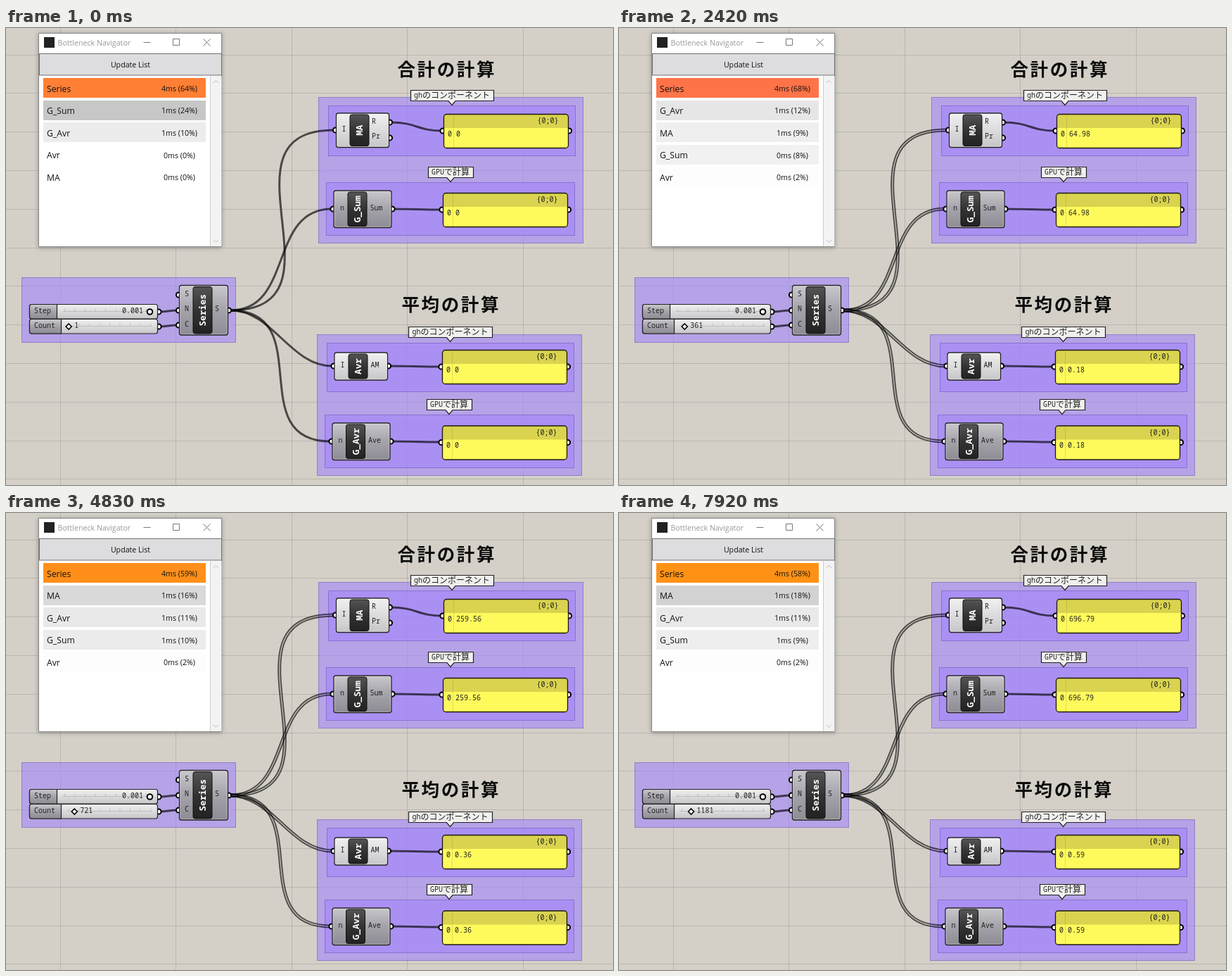
Write an HTML page that moves like this. It is 863 by 649 pixels and loops after 8000 ms.

```html
<!DOCTYPE html>
<html lang="ja">
<head>
<meta charset="utf-8">
<style>
html, body { margin: 0; width: 100%; height: 100%; overflow: hidden; background: #d4d0c8; }
svg { display: block; }
text { fill: #222; white-space: pre; }
.mono { font: 10px "Noto Sans Mono", monospace; }
.kana { font: 12px "Noto Sans CJK JP", "Noto Sans CJK", sans-serif; }
.head { font: bold 25.5px "Noto Sans CJK JP", "Noto Sans CJK", sans-serif; letter-spacing: 2.6px; fill: #0b0b0b; }
.name { font: bold 12.7px "Noto Sans Mono", monospace; fill: #fff; }
.ui { font: 10.65px "Open Sans", sans-serif; fill: #111; }
.row { font: 12.2px "Open Sans", sans-serif; fill: #111; }
.mid { text-anchor: middle; }
.wire { fill: none; stroke: #000; stroke-opacity: .65; stroke-width: 3; }
.group { fill: rgba(165,135,250,.62); stroke: rgba(105,80,185,.55); }
.pin { fill: #fff; stroke: #000; stroke-width: 2; }
.window { fill: #fff; stroke: #888; filter: drop-shadow(0 1px 3px rgba(0,0,0,.3)); }
</style>
</head>
<body>
<script>
const SERIES_OUT = [319, 401];
const LOOP = 8000, TICK = 134.2;
const names = ["Series", "G_Avr", "G_Sum", "MA", "Avr"];
// step, share of each component in %, total ms
const profile = [
  [0, 64, 10, 24, .3, .4, 6.2],
  [10, 73, 12, 8, 4, 1, 5.5],
  [24, 64, 12.1, 8, 12, 2, 6.5],
  [36, 59, 11, 10, 16, 2, 6.5],
  [44, 62, 11, 9, 14, 2, 6.5],
  [49, 57, 11, 10, 18, 2, 6.5],
  [59, 58, 11, 9, 18, 2, 6.5]
];
const greys = [[0, 255], [2, 253], [4, 250], [8, 241], [12, 230], [18, 210], [24, 199], [50, 170]];

const rect = (x, y, w, h, attrs = "") => `<rect x="${x}" y="${y}" width="${w}" height="${h}" ${attrs}/>`;
const path = (d, attrs = "") => `<path d="${d}" ${attrs}/>`;
const text = (x, y, s, cls = "mono", attrs = "") => `<text x="${x}" y="${y}" class="${cls}" ${attrs}>${s}</text>`;
const group = (x, y, x2, y2) => rect(x + .5, y + .5, x2 - x, y2 - y, 'class="group"');
const pin = (x, y) => `<circle cx="${x}" cy="${y}" r="3.6" class="pin"/>`;
const curve = (x1, y1, x2, y2, c) => `M${x1} ${y1}C${x1 + c} ${y1} ${x2 - c} ${y2} ${x2} ${y2}`;
const wire = (...p) => path(curve(...p), 'class="wire"');
const gradient = (id, ...stops) => `<linearGradient id="${id}" x2="0" y2="1">` +
  stops.map((c, i) => `<stop offset="${i / (stops.length - 1)}" stop-color="${c}"/>`).join("") + "</linearGradient>";

function grid() {
  let d = "";
  for (let x = 77; x < 863; x += 164.5) d += `M${Math.floor(x) + .5} 0V649`;
  for (let y = 38; y < 649; y += 54.8) d += `M0 ${Math.floor(y) + .5}H863`;
  return path(d, 'stroke="#000" stroke-opacity=".12"');
}

function dataWire(x, y, c, i) {
  const d = curve(...SERIES_OUT, x, y, c);
  return `<mask id="m${i}" maskUnits="userSpaceOnUse" x="0" y="0" width="863" height="649">
    <rect width="863" height="649" fill="#fff"/>${path(d, 'fill="none" stroke="#000" stroke-opacity=".8" stroke-width="1.5"')}</mask>` +
    path(d, `class="wire data" data-mask="url(#m${i})"`);
}

function node(x, y, w, h, fill, label, lx, ins, outs) {
  const cx = lx + 13.5, cy = y + h / 2;
  const port = ([px, py, s]) => text(px, py + 3.2, s, "mono mid");
  return ins.map(p => pin(x - 1, p[3])).join("") + outs.map(p => pin(x + w + 1, p[3])).join("") +
    rect(x, y, w, h, `rx="3" fill="url(#${fill})" stroke="#222" stroke-width="1.3"`) +
    rect(x + 1.2, y + 1.2, w - 2.4, h - 2.4, 'rx="2" fill="none" stroke="#fff" stroke-opacity=".35"') +
    rect(lx, y + 2, 27, h - 4, 'rx="3" fill="url(#dark)" stroke="#111"') +
    text(0, 4.6, label, "name mid", `transform="translate(${cx} ${cy}) rotate(-90)"`) +
    [...ins, ...outs].map(port).join("");
}

function panel(x, y, cls) {
  const w = 177, h = 48;
  return pin(x - 1.5, y + 23.5) + pin(x + w + 1, y + 23.5) +
    rect(x, y, w, h, 'rx="4" fill="#fffa5c"') +
    path(`M${x} ${y + 19.5}v-15.5q0-4 4-4h${w - 8}q4 0 4 4v15.5z`, 'fill="#d9d34f"') +
    path(`M${x + 14} ${y}v${h}`, 'stroke="#8a8420" stroke-opacity=".25"') +
    rect(x, y, w, h, 'rx="4" fill="none" stroke="#1c1b0c" stroke-width="1.3"') +
    text(x + w - 44, y + 12.5, "{0;0}") + text(x + 5.5, y + 31, "0 0", "mono " + cls);
}

function tag(x, y, w, latin, kana) {
  const c = x + w / 2, lw = latin.length * 6, left = c - (lw + kana.length * 12) / 2;
  return path(`M${x + .5} ${y + .5}h${w}v15H${c + 5}l-5 6l-5-6H${x + .5}z`, 'fill="#f0f0ee" stroke="#222" stroke-width="1.2"') +
    text(left, y + 11, latin) + text(left + lw, y + 12, kana, "kana");
}

function slider(y, split, label) {
  let ticks = "";
  for (let x = split + 11; x < 208; x += 14.5) ticks += `M${x} ${y + 6}v4`;
  return pin(217, y + 10.5) +
    rect(33.5, y, 182, 20.5, 'rx="3" fill="url(#light)" stroke="#222" stroke-width="1.2"') +
    path(`M${split} ${y}H36.5q-3 0-3 3v14.5q0 3 3 3H${split}z`, 'fill="url(#grey)" stroke="#222" stroke-width="1.2"') +
    path(ticks + `M${split + 8} ${y + 10}H208`, 'stroke="#999" stroke-opacity=".45"') +
    text(40, y + 12.5, label);
}

function listWindow() {
  const rows = names.map((_, i) => {
    const y = 71 + 31.6 * i;
    return rect(53, Math.round(y), 231, 28, 'class="bar"') + text(58, y + 19.5, "", "row item") +
      text(246.5, y + 18.7, "", "ui mid share");
  }).join("");
  return rect(46.5, 7.5, 260, 303, 'class="window"') +
    rect(54, 13, 15, 15, 'fill="#222"') +
    text(73.5, 25, "Bottleneck Navigator", "ui", 'style="fill:#999"') +
    path("M195.5 20.5h10M237.5 15.5h9v9h-9zM280.5 15.5l10 10m0-10l-10 10", 'fill="none" stroke="#777"') +
    rect(47.5, 36.5, 259, 30.5, 'fill="#dddddf" stroke="#707070"') +
    text(177, 56, "Update List", "ui mid") +
    rect(290.5, 68, 16, 242, 'fill="#f3f3f3"') + path("M290.5 68v242", 'stroke="#ccc"') +
    path("M295 78l3.5-3.5l3.5 3.5M295 301l3.5 3.5l3.5-3.5", 'fill="none" stroke="#bbb"') + rows;
}

document.body.innerHTML = `<svg width="863" height="649" viewBox="0 0 863 649"><defs>` +
  gradient("light", "#f1f1f1", "#dcdcde", "#c6c6c8") +
  gradient("grey", "#c9c8cc", "#a5a3aa", "#8d8b93") +
  gradient("dark", "#555", "#333", "#222") + "</defs>" + grid() +
  group(22, 354, 326, 446) +
  group(444, 98, 820, 305) + group(458, 110, 809, 181) + group(455, 219, 808, 294) +
  group(442, 435, 818, 635) + group(456, 447, 807, 516) + group(453, 549, 807, 624) +
  [[466, 145, 175], [463, 257, 90], [464, 480, 60], [461, 587, 125]].map((w, i) => dataWire(...w, i)).join("") +
  wire(547, 134, 621, 146, 37) + wire(549, 257, 620, 258, 30) + wire(543, 480, 619, 481, 30) + wire(547, 587, 619, 588, 30) +
  wire(218, 403, 244, 401, 12) + wire(218, 424, 244, 422, 12) +
  slider(392.5, 72.5, "Step") + slider(413.5, 78.5, "Count") +
  text(165, 405, "0.001") + `<circle cx="204.5" cy="403" r="3.8" class="pin"/>` +
  `<path id="knob" d="M0-4l4 4l-4 4l-4-4z" fill="#fff" stroke="#000" stroke-width="1.6"/>` + text(0, 426, "", "mono", 'id="count"') +
  node(246.5, 365.5, 69, 70.5, "grey", "Series", 266, [[257, 378, "S", 379], [257, 399, "N", 401], [257, 421, "C", 422]], [[300, 399, "S", 401]]) +
  node(469.5, 121, 75, 48.5, "light", "MA", 489, [[480.5, 143.5, "I", 145]], [[523, 132.5, "R", 134], [526, 154, "Pr", 156]]) +
  node(466, 231, 82, 52.5, "grey", "G_Sum", 486, [[478, 256, "n", 257]], [[526.5, 256, "Sum", 257]]) +
  node(467, 461, 75.5, 39, "light", "Avr", 487, [[478.5, 479, "I", 480]], [[524.5, 479, "AM", 480]]) +
  node(464, 561, 82, 52.5, "grey", "G_Avr", 483.5, [[475.5, 586, "n", 587]], [[524, 586, "Ave", 587]]) +
  panel(622.5, 122.5, "sum") + panel(621.5, 234.5, "sum") + panel(620.5, 457.5, "avg") + panel(620.5, 565, "avg") +
  tag(575, 88, 118, "gh", "のコンポーネント") + tag(600, 197, 64, "GPU", "で計算") +
  tag(572, 424, 119, "gh", "のコンポーネント") + tag(598, 527, 64, "GPU", "で計算") +
  text(556.5, 67.5, "合計の計算", "head") + text(562.5, 401.5, "平均の計算", "head") +
  listWindow() + "</svg>";

const all = s => [...document.querySelectorAll(s)];
const [wires, bars, items, shares, sums, avgs] = [".data", ".bar", ".item", ".share", ".sum", ".avg"].map(all);
const knob = document.getElementById("knob"), count = document.getElementById("count");

// linear interpolation in a table whose first column is the key
function lookup(table, k) {
  const i = Math.max(1, table.findIndex(r => r[0] >= k));
  const a = table[i - 1], b = table[i], f = (k - a[0]) / (b[0] - a[0]);
  return a.slice(1).map((v, j) => v + (b[j + 1] - v) * f);
}

function shade(p) {
  if (p > 50) return `rgb(255,${149 - (p - 57) * 3.1},${16 + (p - 57) * 5.2})`;
  const g = lookup(greys, p)[0];
  return `rgb(${g},${g},${g})`;
}

function show(step) {
  const n = 1 + 20 * step;
  const x = 89.2 + step * .226;
  knob.setAttribute("transform", `translate(${x} 424)`);
  count.setAttribute("x", x + 8);
  count.textContent = n;
  const sum = +(n * (n - 1) / 2000).toFixed(2), avg = +((n - 1) / 2000).toFixed(2);
  sums.forEach(e => e.textContent = "0 " + sum);
  avgs.forEach(e => e.textContent = "0 " + avg);
  wires.forEach(w => {
    w.style.strokeWidth = n > 1 ? 5 : 3;
    w.style.mask = n > 1 ? w.dataset.mask : "none";
  });
  const values = lookup(profile, step), total = values.pop();
  values.map((p, i) => [p, names[i]]).sort((a, b) => b[0] - a[0]).forEach(([p, name], i) => {
    bars[i].setAttribute("fill", shade(p));
    items[i].textContent = name;
    shares[i].textContent = `${Math.round(p * total / 100)}ms (${Math.round(p)}%)`;
  });
}

let last = -1;
const start = performance.now();
function frame() {
  const t = (performance.now() - start) % LOOP;
  const step = Math.min(59, Math.floor(t / TICK + .6));
  if (step !== last) show(last = step);
  requestAnimationFrame(frame);
}
frame();
</script>
</body>
</html>
```
